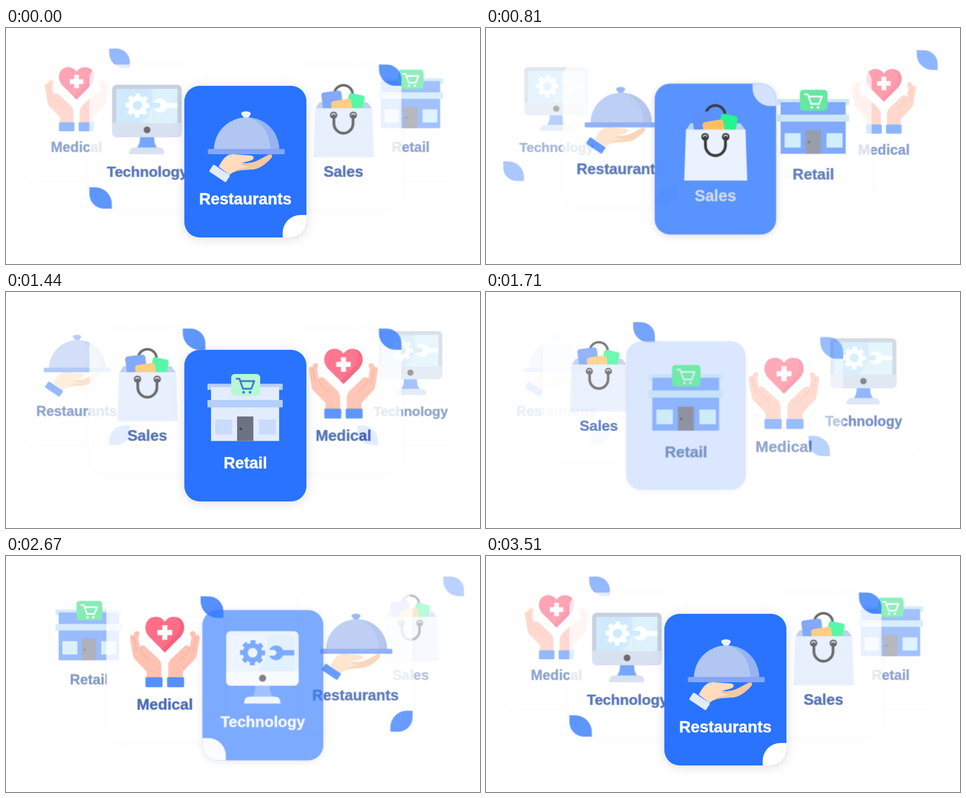
These frames come from a looping animation (800x400 px, 3.75 s). An HTML page:

```html
<!DOCTYPE html>
<html lang="en">
<head>
<meta charset="utf-8">
<title>Industry carousel</title>
<style>
html, body { margin: 0; width: 100%; height: 100%; overflow: hidden; background: #fff; }
#stage { position: relative; width: 800px; height: 400px; overflow: hidden; }

.card {
  position: absolute; left: 301px; top: 98px; width: 206px; height: 257px;
  overflow: visible; transform-origin: 50% 50%;
  animation: ride 3750ms linear infinite, depth 3750ms step-end infinite;
  animation-delay: calc(var(--turn) * 750ms - 3750ms);
}
.face { animation: 3750ms linear infinite; animation-delay: calc(var(--turn) * 750ms - 3750ms); }
.plain { animation-name: plain; }
.lit { animation-name: lit; }
.steady .plain { animation-name: none; }

/* each 20% is one turn: 10 ms wait, 500 ms glide, 240 ms rest */
@keyframes ride {
  0%, .267%, 93.6%, 100% { transform: translate(0, 0) scale(1); opacity: 1; }
  13.6%, 20.267% { transform: translate(-165.5px, -42.5px) scale(.95); opacity: .75; }
  33.6%, 40.267% { transform: translate(-285px, -79.5px) scale(.873); opacity: .5; }
  46.933% { transform: translate(-285px, -79.5px) scale(.873); opacity: 0; }
  46.934% { transform: translate(279px, -79.5px) scale(.873); opacity: 0; }
  53.6%, 60.267% { transform: translate(279px, -79.5px) scale(.873); opacity: .5; }
  73.6%, 80.267% { transform: translate(165.5px, -42.5px) scale(.95); opacity: .75; }
}
@keyframes depth {
  0% { z-index: 3; }
  6.933% { z-index: 2; }
  26.933% { z-index: 1; }
  66.933% { z-index: 2; }
  86.933%, 100% { z-index: 3; }
}
/* the plain face returns quickly on leaving and thins out over the whole arrival */
@keyframes plain {
  0%, .267%, 92.267%, 100% { opacity: 0; }
  6.933%, 80.267% { opacity: 1; }
}
@keyframes lit {
  0%, .267%, 93.6%, 100% { opacity: 1; }
  6.933%, 86.933% { opacity: 0; }
}

.plain {
  --bg: #fff; --text: #1c47a0; --leaf: #2973ff; --shadow: rgba(40, 60, 110, .035);
  --cuff: #2973ff; --heart: #ff4868; --heart2: #ee3a5c;
  --dome: #a6bdf1; --dome2: #98b0e8; --tray: #6692f2; --knob: #749bf3;
  --frame: #b5c1d3; --chin: #cdd9ec; --screen: #bfe3fb; --glare: #d2eefa;
  --tool: #fff; --neck: #4a88ff; --foot: #c8d7ef;
  --bag: #e2ebfc; --fold: #a9c2e8;
  --wall: #4682ff; --trim: #b3dcf5; --pane: #bce8f8; --sign: #20dc78; --cart: #fff; --door: #6c7184;
}
.lit {
  --bg: #2973ff; --text: #fff; --leaf: #fff; --shadow: rgba(40, 50, 80, .16);
  --cuff: #e2ecfc; --heart: #de0f45; --heart2: #bd0840;
  --dome: #b1c6f2; --dome2: #97b4f0; --tray: #83a7f6; --knob: #ebf2ff;
  --frame: #e4edfc; --chin: #f3f7ff; --screen: #e3effd; --glare: #cfe8fb;
  --tool: #2973ff; --neck: #6f9dfb; --foot: #eaf1fd;
  --bag: #edf3ff; --fold: #c2d5f5;
  --wall: #e2ecfd; --trim: #b5cffb; --pane: #c9dcfc; --sign: #b8f7d6; --cart: #3c7bd0; --door: #6c7184;
}
.base { fill: var(--bg); filter: drop-shadow(0 2px 9px var(--shadow)); }
.leaf { fill: var(--leaf); }
.label {
  fill: var(--text); stroke: var(--text); stroke-width: .5px; text-anchor: middle;
  font: bold 27px "Liberation Sans", Arial, sans-serif;
}
</style>
</head>
<body>
<div id="stage"></div>

<svg width="0" height="0" style="position:absolute">
<defs>
  <g id="Restaurants">
    <path fill="#ffdcbd" d="M359 235C366 222 372 213 384 214L412 216C420 216 420 223 412 225L398 229C412 230 421 227 428 223L443 215C449 213 451 217 447 221C436 233 425 240 412 240C398 241 388 240 377 249Z"/>
    <path fill="#f8c79f" d="M398 229C412 230 421 227 428 223L443 215C449 213 451 217 447 221C436 233 425 240 412 240C400 240 392 241 385 244C392 236 404 237 412 235C402 234 396 232 398 229Z"/>
    <rect x="343.500" y="239.500" width="34" height="14" rx="2" transform="rotate(34 360.500 246.500)" fill="var(--cuff)"/>
    <path fill="var(--knob)" d="M397 145C397 140 413 140 413 145C413 149 409 149 409 154H402C402 149 397 149 397 145Z"/>
    <path fill="var(--dome)" d="M351 206A55 54.500 0 0 1 461 206Z"/>
    <path fill="var(--dome2)" d="M410 152C436 160 446 184 446 206H461C461 178 440 153 410 152Z"/>
    <rect x="340.500" y="205" width="130" height="9" rx="3" fill="var(--tray)"/>
  </g>

  <g id="hand">
    <path fill="#ffb39e" d="M343 172C342 167 347 164 349 168C349 162 352 158 357 160C361 162 359 166 357 171L360 188C362 184 367 183 370 187L389 205C395 210 398 215 398 221V242H372V231L354 212C349 208 348 204 347 198Z"/>
    <path fill="none" stroke="#f79c86" stroke-width="1.500" d="M349 168L355 196M360 188C361 196 369 203 378 211"/>
    <rect x="370" y="241" width="30" height="17.500" rx="2" fill="var(--cuff)"/>
  </g>
  <g id="Medical">
    <path fill="var(--heart)" d="M404 197L377 170C366 158 369 143 378 137C388 131 399 135 404 143C409 135 420 131 430 137C439 143 442 158 431 170Z"/>
    <path fill="var(--heart2)" d="M430 137C439 143 442 158 431 170L404 197L399 192L424 166C433 156 434 143 424 134.500Z"/>
    <path stroke="#fff" stroke-width="9" d="M391 162H417M404 149V175"/>
    <use href="#hand"/>
    <use href="#hand" transform="translate(808) scale(-1 1)"/>
  </g>

  <g id="Technology">
    <path fill="var(--neck)" d="M391 226H416C416 238 418 242 422 247H385C389 242 391 238 391 226Z"/>
    <path fill="var(--foot)" d="M372 258C372 250 375 246 382 246H425C431 246 434 250 434 258Z"/>
    <rect x="341.500" y="134" width="123.500" height="93.500" rx="8" fill="var(--frame)"/>
    <path fill="var(--chin)" d="M341.500 202.500H465V219.500A8 8 0 0 1 457 227.500H349.500A8 8 0 0 1 341.500 219.500Z"/>
    <rect x="348.500" y="141.500" width="109" height="61" fill="var(--screen)"/>
    <path fill="var(--glare)" d="M411 141.500H457.500V202.500H395C412 184 415 162 411 141.500Z"/>
    <circle cx="403.500" cy="214.500" r="6" fill="#3a3a3d"/>
    <g fill="none" stroke="var(--tool)">
      <circle cx="386.500" cy="171" r="12.500" stroke-width="8.500"/>
      <circle cx="386.500" cy="171" r="18" stroke-width="7" stroke-dasharray="8 6.137" transform="rotate(-12 386.500 171)"/>
    </g>
    <path fill="var(--tool)" d="M434 166.500H457.500V175.500H434Z"/>
    <circle cx="426.500" cy="171" r="12.500" fill="var(--tool)"/>
    <path fill="var(--screen)" d="M412 166H424L428 171L424 176H412Z"/>
  </g>

  <g id="Sales">
    <path fill="none" stroke="#38383a" stroke-width="4.500" d="M388 172V150A16 15 0 0 1 420 150V172"/>
    <path fill="var(--fold)" d="M361.500 165.500H446.500L455 177H354Z"/>
    <rect x="366" y="146" width="36" height="34" rx="5" fill="#5a8cfa" transform="rotate(-7 384 163)"/>
    <rect x="411" y="151" width="29" height="30" rx="5" fill="#1ef58c" transform="rotate(12 426 166)"/>
    <rect x="383" y="161" width="36" height="24" rx="5" fill="#ffbe5c" transform="rotate(-9 401 173)"/>
    <path fill="var(--bag)" d="M354 176H455L458 263H351Z"/>
    <g fill="#38383a">
      <circle cx="386.500" cy="188.500" r="6.500"/>
      <circle cx="421.500" cy="188.500" r="6.500"/>
    </g>
    <path fill="none" stroke="#38383a" stroke-width="4.800" d="M387 188V203A17 17.500 0 0 0 421 203V188"/>
    <path fill="none" stroke="#e4ecfa" stroke-width="1.600" d="M383.500 188.500a3 3 0 0 1 6 0M418.500 188.500a3 3 0 0 1 6 0"/>
  </g>

  <g id="Retail">
    <rect x="346" y="158" width="115" height="94.500" fill="var(--wall)"/>
    <path fill="var(--trim)" d="M340 155.500H467V166H461V161H346V166H340Z"/>
    <rect x="340" y="183" width="127" height="12.500" fill="var(--trim)"/>
    <rect x="353" y="216" width="28.500" height="25.500" fill="var(--pane)"/>
    <rect x="427" y="216" width="28.500" height="25.500" fill="var(--pane)"/>
    <rect x="390" y="211" width="27.500" height="41.500" fill="var(--door)"/>
    <circle cx="396" cy="232" r="2.200" fill="#3f4350"/>
    <rect x="380" y="139" width="49" height="37" rx="6" fill="var(--sign)"/>
    <path fill="none" stroke="var(--cart)" stroke-width="3" stroke-linejoin="round" stroke-linecap="round" d="M389 147H394L400 164H414L419 151H396"/>
    <circle cx="401" cy="170" r="2.300" fill="var(--cart)"/>
    <circle cx="412" cy="170" r="2.300" fill="var(--cart)"/>
  </g>

  <path id="leaf" d="M467 98H481A26 26 0 0 1 507 124V136H497A30 30 0 0 1 467 106Z"/>
</defs>
</svg>

<script>
const corners = {
  topRight: '',
  bottomRight: 'translate(0 453) scale(1 -1)',
  bottomLeft: 'rotate(180 404 226.5)'
};

// in order of arrival at the centre; a steady card keeps its plain face under the lit one
const cards = [
  { name: 'Restaurants', leaf: 'bottomRight' },
  { name: 'Sales', leaf: 'topRight', steady: true },
  { name: 'Retail' },
  { name: 'Medical', leaf: 'topRight' },
  { name: 'Technology', leaf: 'bottomLeft', size: 26 }
];

const face = (kind, { name, leaf, size = 27 }) => `
  <g class="face ${kind}">
    <rect class="base" x="301" y="98" width="206" height="257" rx="26"/>
    ${leaf ? `<use class="leaf" href="#leaf" transform="${corners[leaf]}"/>` : ''}
    <use href="#${name}"/>
    <text class="label" x="404" y="298.5" style="font-size:${size}px">${name}</text>
  </g>`;

document.getElementById('stage').innerHTML = cards.map((card, i) => `
  <svg class="card ${card.steady ? 'steady' : ''}" viewBox="301 98 206 257" style="--turn:${i}">
    ${face('plain', card)}${face('lit', card)}
  </svg>`).join('');
</script>
</body>
</html>
```
